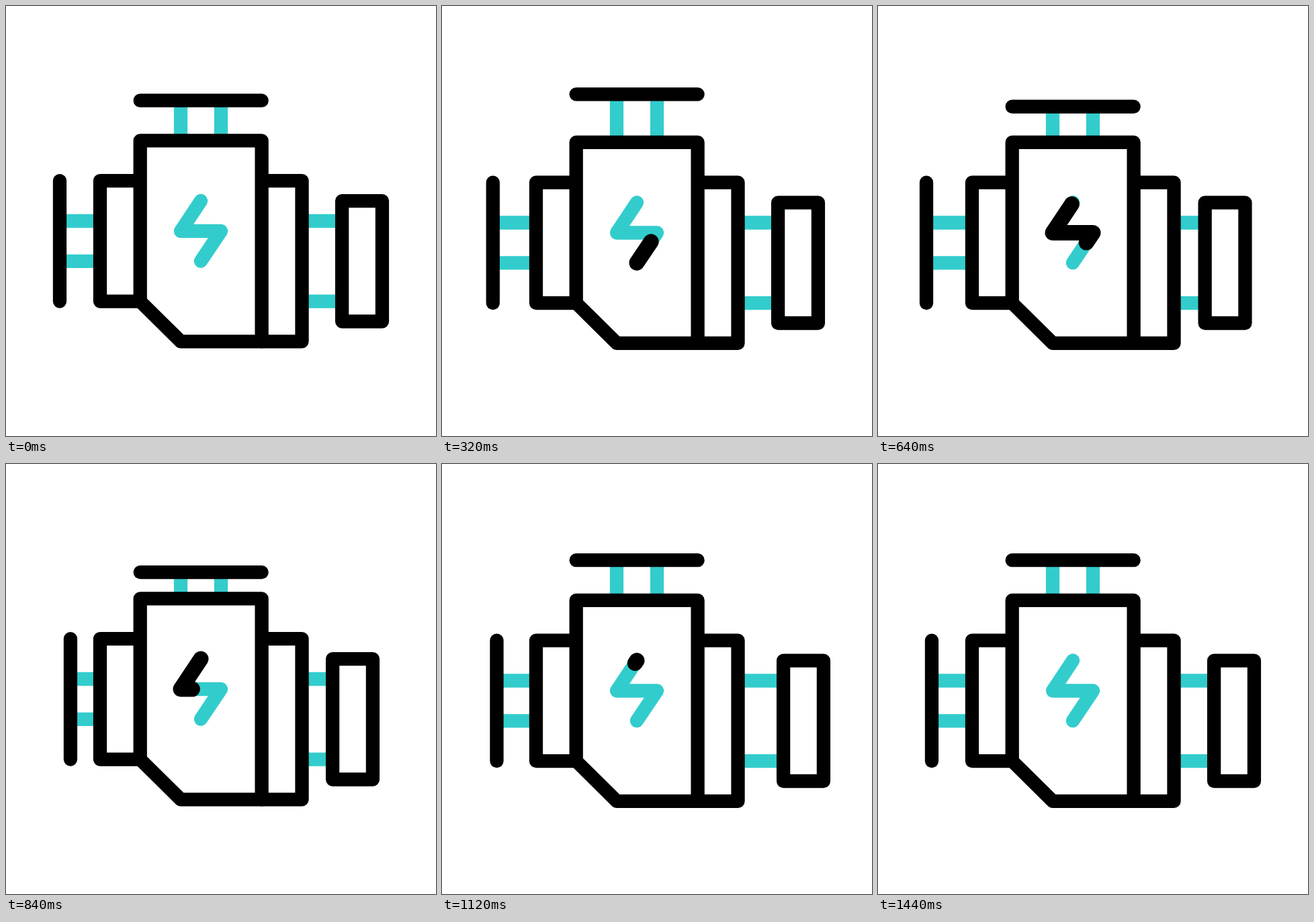
Write an HTML page without scripts that moves like this. It is 640 by 640 pixels and loops after 1.48 s.

```html
<!DOCTYPE html>
<html lang="en">
<head>
<meta charset="utf-8">
<title>Engine</title>
<style>
  /* one clock of 40 ms ticks drives every part */
  @property --tick { syntax: "<number>"; inherits: true; initial-value: 0; }
  @keyframes clock { to { --tick: 37; } }

  html, body { margin: 0; height: 100%; overflow: hidden; background: #fff; }
  svg { display: block; width: 100vw; height: 100vh; animation: clock 1.48s steps(37) -4ms infinite; }

  .metal, .pipe, .bolt { fill: none; stroke: #3cc; stroke-width: 20.3; stroke-linejoin: round; }
  .metal { fill: #fff; stroke: #000; }
  .metal, .bolt { stroke-linecap: round; }

  .engine {
    --swing: min(1, var(--tick) / 2);
    transform: translateY(calc(2.5px * var(--swing) * cos(var(--tick) * 90deg)));
  }

  /* each part eases to --first, then to --second, then home */
  .part {
    --age: (var(--tick) - var(--start));
    --a: clamp(0, var(--age) / 10, 1);
    --b: clamp(0, (var(--age) - 10) / 9, 1);
    --c: clamp(0, (var(--age) - 19) / 6, 1);
    --ease-a: (var(--a) * var(--a) * (3 - 2 * var(--a)));
    --ease-b: (var(--b) * var(--b) * (3 - 2 * var(--b)));
    --ease-c: (var(--c) * var(--c) * (3 - 2 * var(--c)));
    --shift: calc(1px * (var(--first) * var(--ease-a)
      + (var(--second) - var(--first)) * var(--ease-b)
      - var(--second) * var(--ease-c)));
    transform: translateX(var(--shift));
  }
  .top { --start: 1; --first: -15; --second: 22; transform: translateY(var(--shift)); }
  .left { --start: 4; --first: -12; --second: 20; }
  .right { --start: 9; --first: -17.2; --second: 8; }

  /* the spark's head runs along the bolt, its tail follows */
  .spark {
    --h: clamp(0, (var(--tick) - 4) / 13, 1);
    --t: clamp(0, (var(--tick) - 10) / 20, 1);
    --head: (var(--h) * var(--h) * (3 - 2 * var(--h)));
    --tail: (var(--t) * var(--t) * (3 - 2 * var(--t)));
    --length: (var(--head) - var(--tail));
    stroke: #000;
    stroke-width: 23;
    stroke-dasharray: calc(100px * var(--length)) 300px;
    stroke-dashoffset: calc(-100px * var(--tail));
    opacity: clamp(0, 1000 * var(--length) - 1, 1);
  }
</style>
</head>
<body>
<svg viewBox="0 0 640 640">
  <defs>
    <path id="zigzag" d="M290 379.7L320 335H260L290 290" pathLength="100"/>
  </defs>
  <g class="engine">
    <g class="part top">
      <path class="pipe" d="M260 141V212M320 141V212"/>
      <path class="metal" d="M199.7 140.7H380.6"/>
    </g>
    <g class="part left">
      <path class="pipe" d="M80 320H150M80 379.8H150"/>
      <path class="metal" d="M80 260.2V439.6"/>
    </g>
    <g class="part right">
      <path class="pipe" d="M430 320H500M430 439.6H500"/>
      <path class="metal" d="M500.1 290.1H559.9V469.5H500.1Z"/>
    </g>
    <g class="metal">
      <path d="M199.7 260.2H140V439.6H199.7"/>
      <path d="M380.6 260.2H440.5V499.3H380.6"/>
      <path d="M199.7 200.4H380.6V499.3H260L199.7 439.6Z"/>
    </g>
    <use class="bolt" href="#zigzag"/>
    <use class="bolt spark" href="#zigzag"/>
  </g>
</svg>
</body>
</html>
```
